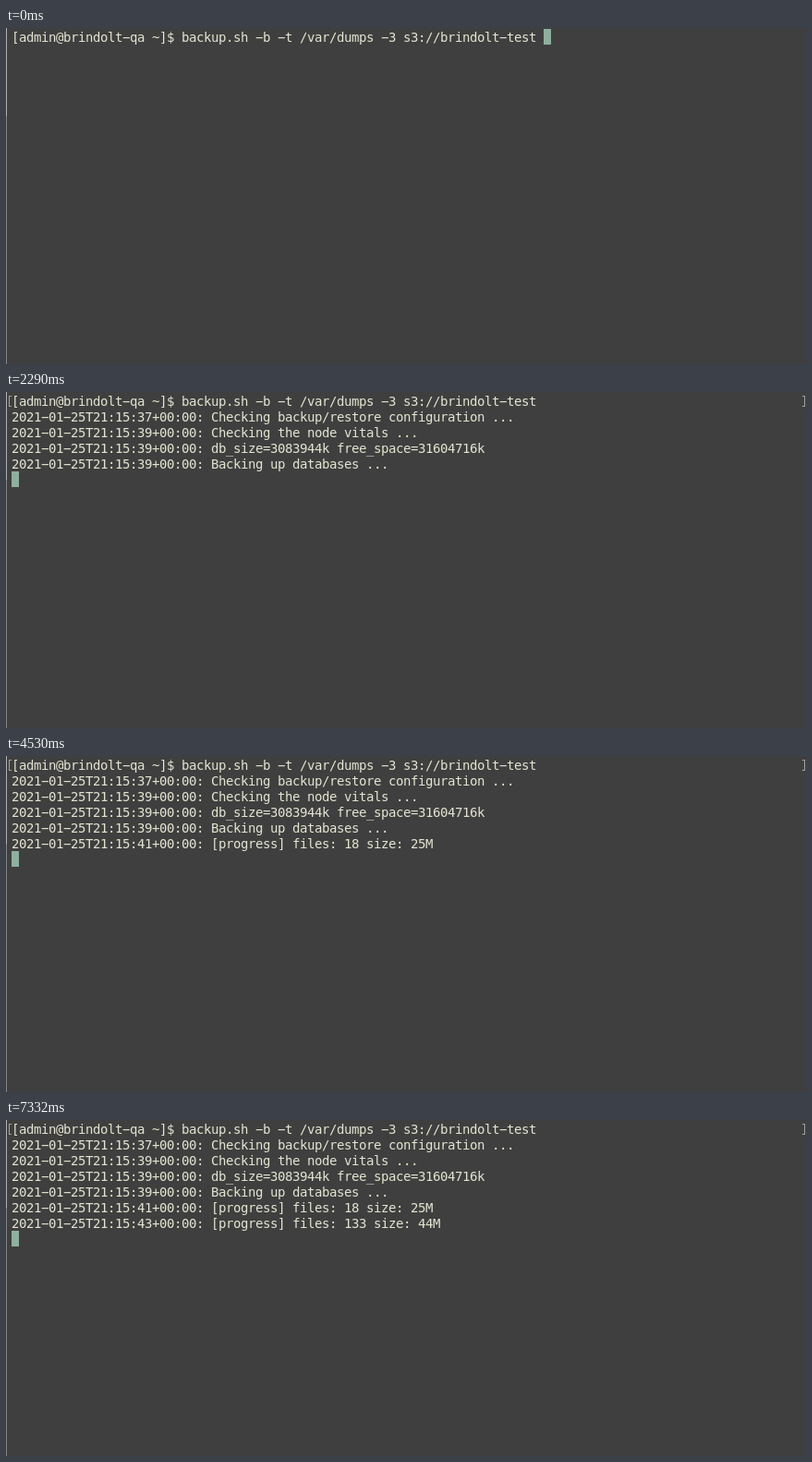
Animation of 866 by 364 pixels, one loop 8 s. Source, as an HTML page with a canvas:

```html
<!DOCTYPE html>
<html lang="en">
<head>
<meta charset="utf-8">
<title>Backup terminal</title>
<style>
  html, body { margin: 0; width: 100%; height: 100%; overflow: hidden; background: #3f3f3f; }
  canvas { display: block; }
</style>
</head>
<body>
<canvas id="stage" width="866" height="364"></canvas>
<script>
const ctx = document.getElementById('stage').getContext('2d');
const LOOP = 8000;
const CELL = { x: 6, y: 1, w: 8, h: 17, baseline: 14 };
const COLORS = { back: '#3f3f3f', text: '#e4e4d2', cursor: '#8faf9f', mark: '#a3a399' };

const command = '[admin@brindolt-qa ~]$ backup.sh -b -t /var/dumps -3 s3://brindolt-test ';
const stamp = (second, message) => `2021-01-25T21:15:${second}+00:00: ${message}`;

const output = [
  { at: 650, text: stamp(37, 'Checking backup/restore configuration ...') },
  { at: 2290, text: stamp(39, 'Checking the node vitals ...') },
  { at: 2290, text: stamp(39, 'db_size=3083944k free_space=31604716k') },
  { at: 2290, text: stamp(39, 'Backing up databases ...') },
  { at: 4530, text: stamp(41, '[progress] files: 18 size: 25M') },
  { at: 6330, text: stamp(43, '[progress] files: 133 size: 44M') }
];
const MARK_AT = 500;

function rect(color, x, y, w, h) {
  ctx.fillStyle = color;
  ctx.fillRect(x, y, w, h);
}

// The terminal face has a wide dash, so hyphens use the minus glyph.
function drawLine(text, row) {
  ctx.fillStyle = COLORS.text;
  const y = CELL.y + row * CELL.h + CELL.baseline;
  [...text.replace(/-/g, '\u2212')].forEach((char, col) => {
    ctx.fillText(char, CELL.x + col * CELL.w, y);
  });
}

function drawCursor(col, row) {
  rect(COLORS.cursor, CELL.x + col * CELL.w, CELL.y + row * CELL.h, CELL.w, CELL.h);
}

function drawMark(x, stemX) {
  rect(COLORS.mark, stemX, 4, 1, 12);
  rect(COLORS.mark, x, 4, 3, 1);
  rect(COLORS.mark, x, 15, 3, 1);
}

function draw(time) {
  rect(COLORS.back, 0, 0, 866, 364);
  rect('#b2b2b2', 0, 0, 1, 95);
  rect('#858585', 0, 95, 1, 269);
  ctx.font = '14px "DejaVu Sans Mono", monospace';

  const lines = output.filter(line => time >= line.at);
  drawLine(command, 0);
  lines.forEach((line, i) => drawLine(line.text, i + 1));

  if (time >= MARK_AT) {
    drawMark(3, 3);
    drawMark(862, 864);
  }
  if (lines.length) drawCursor(0, lines.length + 1);
  else drawCursor(command.length, 0);
}

const start = performance.now();
function tick() {
  draw((performance.now() - start) % LOOP);
  requestAnimationFrame(tick);
}
tick();
</script>
</body>
</html>
```
